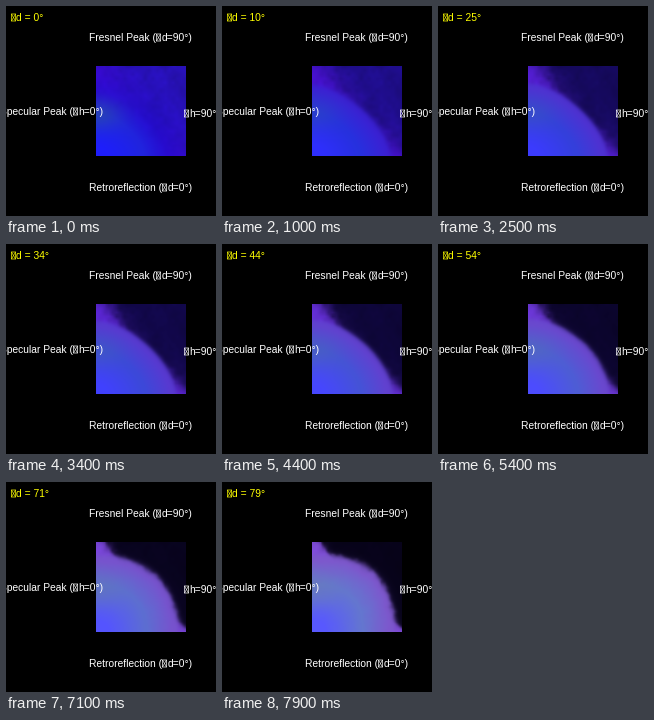
Recreate the animation shown at these times as a matplotlib script. Size 210 px wide and 210 px high, loop 8000 ms.

```python
import numpy as np
import matplotlib.pyplot as plt
from matplotlib.animation import FuncAnimation
from matplotlib.patches import Rectangle

STAGE, SIDE, FRAMES = 210, 90, 80
FONT = dict(family="Liberation Sans", size=10.2 * 0.72, va="baseline")

# Pixel centres of the slice, measured from its lower left corner.
u, v = np.meshgrid(np.arange(SIDE) + 0.5, SIDE - np.arange(SIDE) - 0.5)
rng = np.random.default_rng(4)


def smooth_noise(cells):
    knots = np.arange(cells + 1)
    x = np.linspace(0, cells, SIDE)
    grid = rng.uniform(-1, 1, (cells + 1, cells + 1))
    rows = np.array([np.interp(x, knots, r) for r in grid])
    return np.array([np.interp(x, knots, c) for c in rows.T]).T


grain = 0.6 * smooth_noise(9) + 0.4 * smooth_noise(22)


def lerp(a, b, t):
    a, b = np.array(a, float), np.array(b, float)
    return a + (b - a) * t


def mix(a, b, mask):
    return lerp(a, b, np.clip(mask, 0, 1)[..., None])


def step(x, soft):
    return 0.5 + 0.5 * np.tanh(x / soft)


def slice_image(deg):
    s = deg / (FRAMES - 1)
    ease = s ** 0.6
    core = lerp((30, 30, 252), (88, 88, 255), ease)
    band = lerp((30, 38, 225), (100, 118, 208), s)
    rim = lerp((30, 12, 215), (125, 88, 205), ease)
    edge = lerp((60, 8, 195), (120, 72, 205), s)
    dark = np.array([35, 15, 170]) * np.exp(-deg / 35) + (4, 2, 8)
    teal = lerp((40, 85, 165), (105, 125, 182), s)

    # The lobe swells from a flat arc to a full superellipse.
    power = 1.6 + 0.95 * s ** 4
    wide, tall = 78 + 5 * s, 70 + 8 * s
    rel = ((u / wide) ** power + (v / tall) ** power) ** (1 / power)
    rel = rel + 0.03 * s ** 3 * grain

    lobe = mix(core, band, (rel - 0.15) / 0.45)
    lobe = mix(lobe, rim, (rel - 0.62) / 0.3)
    glow = np.exp(-(u / 26) ** 2 - ((v - 43) / 16) ** 2)
    lobe = mix(lobe, teal, glow * (0.25 + 0.3 * s + 0.4 * np.exp(-deg / 4)))

    # Purple strips hug both axes and widen towards the lobe.
    width = 14 - 6 * s
    strip = np.maximum(width + 0.7 * (SIDE - v) - u,
                       0.6 * width + 0.7 * (SIDE - u) - v)
    outer = mix(dark, edge, step(strip + 5 * grain, 18 - 15 * ease))
    outer = outer * (1 + 0.12 * grain[..., None])

    soft = 0.035 + 0.3 * np.exp(-deg / 3)
    img = mix(lobe, outer, step(rel - 1, soft))
    return np.clip(img, 0, 255).astype(np.uint8)


fig = plt.figure(figsize=(2.1, 2.1), dpi=100, facecolor="black")
ax = fig.add_axes([0, 0, 1, 1])
picture = ax.imshow(slice_image(0), extent=(90, 180, 150, 60),
                    interpolation="nearest", aspect="auto")
ax.set(xlim=(0, STAGE), ylim=(STAGE, 0))
ax.axis("off")


def label(x, base, before, after, color="white"):
    """Text around a small crossed box standing at x."""
    left, right, top = x + 0.5, x + 4.5, base - 7
    ax.add_patch(Rectangle((left, top), 4, 7, fill=False, edgecolor=color,
                           linewidth=0.5, snap=False, zorder=3))
    for y0, y1 in ((top, base), (base, top)):
        ax.plot([left, right], [y0, y1], color=color, linewidth=0.4, zorder=3)
    ax.text(x, base, before, ha="right", color=color, **FONT)
    return ax.text(x + 5.2, base, after, color=color, **FONT)


label(150, 35, "Fresnel Peak (", "d=90°)")
label(67, 109, "Specular Peak (", "h=0°)")
label(178, 111, "", "h=90°)")
label(156, 185, "Retroreflection (", "d=0°)")
counter = label(5, 15, "", "d = 0°", "yellow")


def draw(deg):
    picture.set_data(slice_image(deg))
    counter.set_text(f"d = {deg}°")
    return picture, counter


anim = FuncAnimation(fig, draw, frames=FRAMES, interval=100, repeat=True,
                     repeat_delay=0)
plt.show()
```
